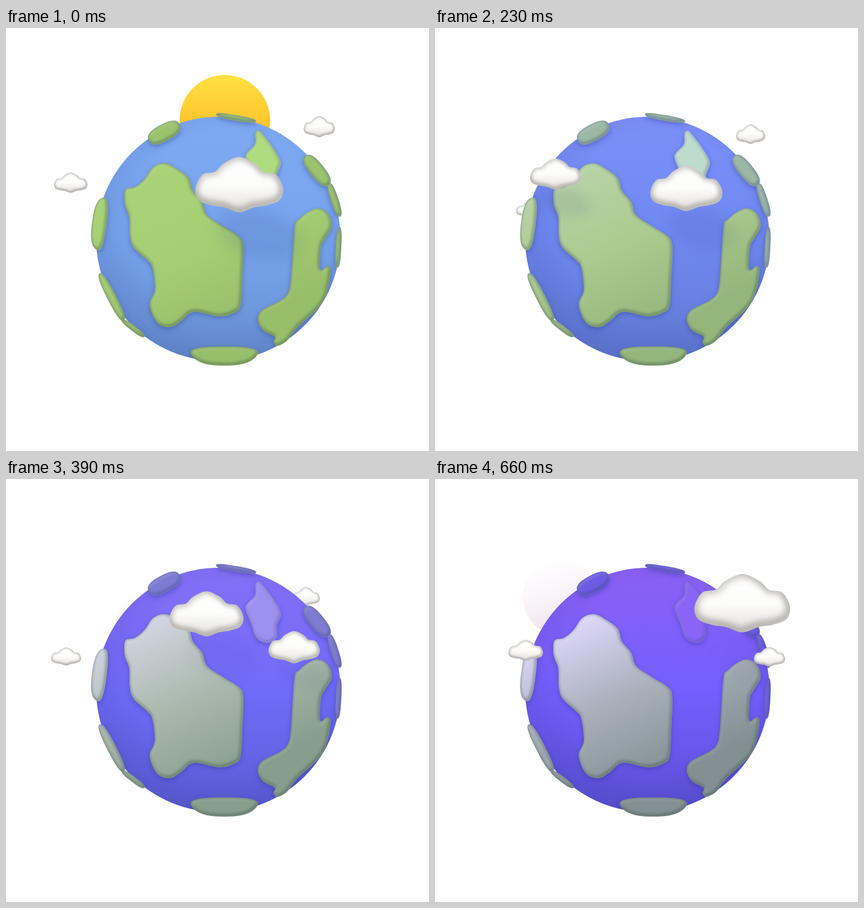
Write an HTML page with a canvas that moves like this. It is 748 by 748 pixels and loops after 0.69 s.

```html
<!DOCTYPE html>
<html lang="en">
<head>
<meta charset="utf-8">
<title>Day and night globe</title>
<style>
  html, body { margin: 0; width: 100%; height: 100%; overflow: hidden; background: #fff; }
  canvas { display: block; width: 748px; height: 748px; }
</style>
</head>
<body>
<canvas id="stage" width="748" height="748"></canvas>
<script>
const ctx = document.getElementById('stage').getContext('2d');
const LOOP = 690, LAST = 20, TAU = 2 * Math.PI;
const GLOBE = { x: 375.5, y: 373, r: 216 };

const lerp = (a, b, t) => a + (b - a) * t;
const smoothstep = t => (t = Math.min(1, t)) * t * (3 - 2 * t);
const lateStep = t => smoothstep(t ** 1.25);

// Closed smooth curve through [x, y] points.
function smooth(points) {
  const path = new Path2D(), n = points.length;
  const at = i => points[(i + n) % n];
  path.moveTo(...at(0));
  for (let i = 0; i < n; i++) {
    const [a, b, c, d] = [at(i - 1), at(i), at(i + 1), at(i + 2)];
    path.bezierCurveTo(
      b[0] + (c[0] - a[0]) / 6, b[1] + (c[1] - a[1]) / 6,
      c[0] - (d[0] - b[0]) / 6, c[1] - (d[1] - b[1]) / 6, ...c);
  }
  path.closePath();
  return path;
}

const outline = text => smooth(text.split(' ').map(p => p.split(',').map(Number)));

// Rounded pad; its local x axis is turned by deg, taper narrows the lower side.
function pad(x, y, rx, ry, deg, taper = 0) {
  const turn = deg * Math.PI / 180, cos = Math.cos(turn), sin = Math.sin(turn);
  const bulge = v => Math.sign(v) * Math.abs(v) ** .77;
  return smooth(Array.from({ length: 16 }, (_, i) => {
    const v = bulge(Math.sin(i / 16 * TAU));
    const px = rx * bulge(Math.cos(i / 16 * TAU)) * (1 - taper * v), py = ry * v;
    return [x + px * cos - py * sin, y + px * sin + py * cos];
  }));
}

const mainLand = outline('281,239 301,248 323,265 331,288 347,307 356,331 385,351 ' +
  '413,369 420,388 418,440 415,490 404,503 377,510 332,502 310,518 290,529 267,521 ' +
  '254,489 263,464 259,425 250,411 226,389 219,368 218,335 210,312 211,286 228,281 245,267 260,246');
const eastLand = outline('553,319 570,329 576,351 564,373 557,388 556,427 568,421 574,432 ' +
  '560,485 515,530 497,553 480,562 473,555 475,546 455,535 445,516 453,499 485,482 ' +
  '499,468 504,440 510,352 517,339 536,324');
const northLand = outline('447,181 457,191 474,214 486,238 479,260 478,281 462,290 ' +
  '443,281 434,257 424,232 426,221 440,206 441,187');
const nearPads = [
  pad(165, 346, 46, 13, 97, .12),
  pad(187, 476, 47, 8, 63),
  pad(225, 531, 25, 5, 37),
  pad(386, 580, 57, 17, 0, .22)
];
const farPads = [
  pad(280, 185, 31, 15, -28),
  pad(407, 159, 36, 5, 10),
  pad(550, 252, 33, 13, 51),
  pad(581, 304, 31, 7, 72),
  pad(588, 388, 36, 5, 93)
];

// Right half of a cloud, from its top down; the left half mirrors it.
const half = [[0, 0], [.18, .12], [.28, .27], [.42, .32], [.5, .57],
  [.46, .78], [.32, .87], [.17, .91], [0, 1]];
const puffs = [...half, ...half.slice(1, -1).reverse().map(([x, y]) => [-x, y])];

const clouds = {
  front(n) {
    const u = n / LAST, e = lateStep(u);
    return { x: lerp(412.5, 591.5, e), y: lerp(277, 314.5, e),
      w: lerp(155, 55, smoothstep(u)), ratio: .63 };
  },
  rising(n) {
    const u = n / LAST, e = smoothstep(u);
    return { x: lerp(114.5, 543.5, lerp(lateStep(u), u, .3)), y: lerp(273.5, 219.5, e),
      w: lerp(59, 169, e), ratio: .61 };
  },
  back: n => ({ x: 554 + 4.17 * n - .51 * n * n, y: 174.5 + .69 * n + .172 * n * n,
    w: 55 - n / 2, ratio: .68 }),
  left(n) {
    const d = lateStep(n / LAST) - .57;
    return { x: 106 + (350 - 130 * d) * d * d, y: 330 - 1.35 * n, w: 41 + n, ratio: .61 };
  }
};

// Day, dusk, night.
const palette = {
  seaTop:  ['#7fa9f2', '#7b88fc', '#8b60f4'],
  seaMid:  ['#78a4ee', '#6c80f2', '#745fff'],
  seaLow:  ['#688fd0', '#5f74d2', '#5b50d6'],
  landTop: ['#a9d377', '#bdd3b8', '#dfd8fc'],
  landMid: ['#a6cf75', '#abca97', '#a9b0bb'],
  landLow: ['#97be6a', '#92b481', '#829093'],
  north:   ['#afdc7e', '#c2dce4', '#8964f6'],
  far:     ['#9ac46c', '#9bb4b4', '#6d5be4']
};

const night = n => smoothstep(n / 16.5);

function tint(name, n) {
  const t = night(n) * 2, i = Math.min(1, Math.floor(t)), list = palette[name];
  const part = (hex, k) => parseInt(hex.substr(1 + 2 * k, 2), 16);
  return `rgb(${[0, 1, 2].map(k =>
    Math.round(lerp(part(list[i], k), part(list[i + 1], k), t - i)))})`;
}

function ramp(x0, y0, x1, y1, stops) {
  const g = ctx.createLinearGradient(x0, y0, x1, y1);
  stops.forEach((c, i) => g.addColorStop(i / (stops.length - 1), c));
  return g;
}

function disc(x, y, r, fill) {
  ctx.beginPath();
  ctx.arc(x, y, r, 0, TAU);
  ctx.fillStyle = fill;
  ctx.fill();
}

function inGlobe(paint) {
  ctx.save();
  ctx.beginPath();
  ctx.arc(GLOBE.x, GLOBE.y, GLOBE.r, 0, TAU);
  ctx.clip();
  paint();
  ctx.restore();
}

// Rounded body: light falls on the upper left edge, the lower right one darkens.
function puff(path, fill, width, dark, light) {
  ctx.save();
  ctx.fillStyle = fill;
  ctx.fill(path);
  ctx.clip(path);
  ctx.filter = `blur(${width * .35}px)`;
  ctx.lineWidth = width;
  for (const [color, shift] of [[light, .3], [dark, -.3]]) {
    ctx.save();
    ctx.translate(shift * width * .6, shift * width);
    ctx.strokeStyle = color;
    ctx.stroke(path);
    ctx.restore();
  }
  ctx.restore();
}

function drawCloud({ x, y, w, ratio }) {
  const h = w * ratio, top = y - h / 2;
  const path = smooth(puffs.map(([px, py]) => [x + px * w, top + py * h]));
  const fill = ramp(0, top, 0, top + h, ['#ffffff', '#fcfcfb', '#e2e0dd']);
  puff(path, fill, w * .08, 'rgba(125,120,112,.42)', 'rgba(160,155,152,.2)');
}

function castShadow({ x, y, w }, n) {
  ctx.filter = `blur(${w * .08}px)`;
  ctx.beginPath();
  ctx.ellipse(x + w * .22, y + w * .56, w * .48, w * .27, .25, 0, TAU);
  ctx.fillStyle = `rgba(35,45,110,${.11 - .08 * night(n)})`;
  ctx.fill();
}

function drawGlobe(n) {
  const { x, y, r } = GLOBE, c = name => tint(name, n);
  disc(x, y, r, ramp(0, y - r, 0, y + r, [c('seaTop'), c('seaMid'), c('seaLow')]));
  const edge = ctx.createRadialGradient(x + 18, y - 28, r * .75, x + 18, y - 28, r * 1.17);
  edge.addColorStop(0, 'rgba(30,40,120,0)');
  edge.addColorStop(1, 'rgba(30,40,120,.14)');
  disc(x, y, r, edge);

  inGlobe(() => {
    ctx.filter = 'blur(4px)';
    ctx.translate(0, 3);
    ctx.fillStyle = 'rgba(35,45,130,.36)';
    [mainLand, eastLand, northLand, ...nearPads, ...farPads].forEach(p => ctx.fill(p));
  });

  const land = ramp(200, 270, 330, 560, [c('landTop'), c('landMid'), c('landLow')]);
  const dark = 'rgba(45,70,60,.38)', light = 'rgba(255,255,255,.16)';
  farPads.forEach(p => puff(p, c('far'), 6, 'rgba(40,50,110,.34)', light));
  nearPads.forEach(p => puff(p, land, 6, dark, light));
  puff(northLand, c('north'), 6, 'rgba(50,60,130,.3)', light);
  puff(mainLand, land, 6, dark, light);
  puff(eastLand, land, 6, dark, light);

  inGlobe(() => {
    castShadow(clouds.front(n), n);
    castShadow(clouds.rising(n), n);
  });
}

function draw(n) {
  ctx.fillStyle = '#fff';
  ctx.fillRect(0, 0, 748, 748);
  if (n < 9) {
    const x = 387 - 4 * n, y = 163 + 14 * n;
    disc(x, y, 80, ramp(0, y - 80, 0, y + 30, ['#ffe142', '#fdbe25']));
  }
  if (n > 11) {
    const x = 222 + 4.6 * (LAST - n), y = 209 + 6.2 * (LAST - n);
    disc(x, y, 67, ramp(x - 30, y - 62, x + 10, y + 67, ['#ffffff', '#f9f3f9', '#ebdfeb']));
  }
  const leftInFront = n >= 14;
  drawCloud(clouds.back(n));
  if (!leftInFront) drawCloud(clouds.left(n));
  drawGlobe(n);
  if (leftInFront) drawCloud(clouds.left(n));
  drawCloud(clouds.front(n));
  drawCloud(clouds.rising(n));
}

// Thirty pictures a second, each start cut to whole hundredths.
const stepAt = t => Math.min(LAST, Math.floor((Math.floor(t / 10) + .999) / 3.33));

const start = performance.now();
let shown = -1;
function tick() {
  const n = stepAt((performance.now() - start) % LOOP);
  if (n !== shown) draw(shown = n);
  requestAnimationFrame(tick);
}
tick();
</script>
</body>
</html>
```
